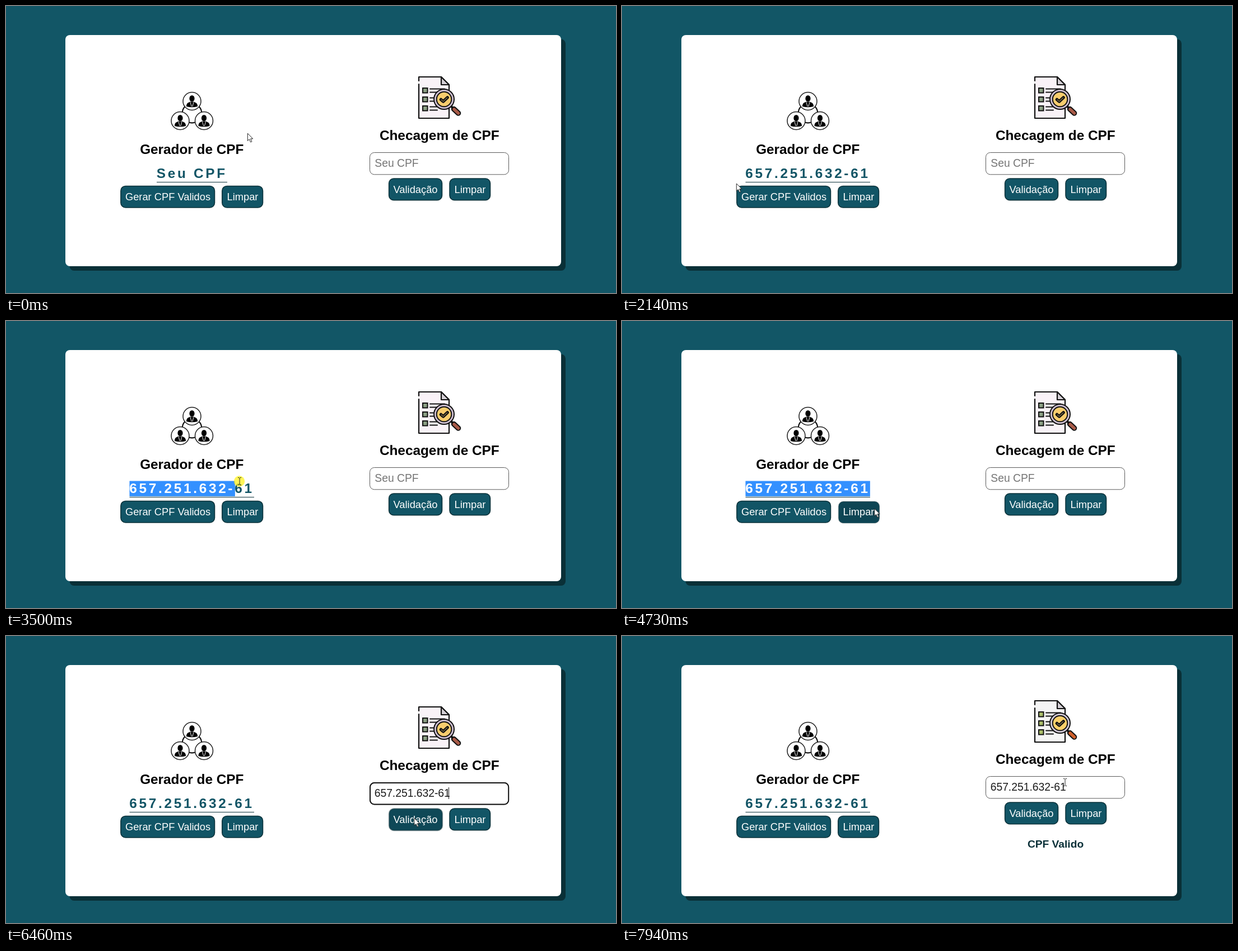
An HTML page that plays this animation: 1089 by 514 pixels, repeating every 8000 ms.

```html
<!DOCTYPE html>
<html lang="pt-BR">
<head>
<meta charset="utf-8">
<title>CPF</title>
<style>
  html, body { margin: 0; width: 100%; height: 100%; overflow: hidden; background: #125666; }
  svg { display: block; width: 1089px; height: 514px; font-family: "Liberation Sans", Arial, sans-serif; }

  /* Page state: 0/1 switches read by the parts below */
  #stage { animation: state 8s step-end infinite; }
  @keyframes state {
    0% { --made: 0; --focus: 0; --caret: 0; --pasted: 0; --done: 0;
         --page: #f9f2f7; --box: #8b9f83; --grip: #a95b48; --lens: #f8cd6e; --ring: #cfc0d2; }
    16.9% { --made: 1; }
    68.75% { --focus: 1; --caret: 1; }
    73.9% { --caret: 0; }
    76.4% { --pasted: 1; --caret: 1; }
    81.6% { --focus: 0; --caret: 0; --done: 1;
            --page: #f5f5f5; --box: #a9bc68; --grip: #d0602b; --lens: #fbd06a; --ring: #d3cbd8; }
  }
  .before { opacity: calc(1 - var(--made)); }
  .made { opacity: var(--made); }
  .focus { opacity: var(--focus); }
  .hint { opacity: calc(1 - var(--pasted)); }
  .pasted { opacity: var(--pasted); }
  .done { opacity: var(--done); }
  .caret { opacity: var(--caret); transform: translateX(calc(var(--pasted) * 132px)); }
  #check { transform: translateY(calc(var(--done) * -11px)); }

  .title { font-size: 24.35px; font-weight: bold; text-anchor: middle; fill: #000; }
  .cpf { font-size: 24.35px; font-weight: bold; letter-spacing: 3.7px; fill: #125566; }
  .field { font-size: 19.3px; }
  .btn rect { fill: #125566; stroke: #0a3038; stroke-width: 1.5px; }
  .btn text { font-size: 18.3px; fill: #fff; text-anchor: middle; }

  /* Buttons under the pointer */
  .make rect { animation: hoverMake 8s linear infinite; }
  .clear rect { animation: hoverClear 8s linear infinite; }
  .valid rect { animation: hoverValid 8s linear infinite; }
  @keyframes hoverMake {
    0%, 12.5% { fill: #125566; stroke: #0a3038; transform: none; filter: drop-shadow(0 0 0 #0000); }
    14% { stroke: #0a303800; transform: translate(1.2px, 1.2px); }
    16.3%, 20.6% { fill: #08303a; stroke: #0a303800; transform: translate(1.2px, 1.2px); filter: drop-shadow(1.7px 1.7px 0 #000); }
    24.4%, 100% { fill: #125566; stroke: #0a3038; transform: none; filter: drop-shadow(0 0 0 #0000); }
  }
  @keyframes hoverClear {
    0%, 57.3% { fill: #125566; stroke: #0a3038; transform: none; filter: drop-shadow(0 0 0 #0000); }
    59.5% { fill: #0d4250; stroke: #0a303800; transform: translate(1px, 1px); filter: drop-shadow(1px 1px 0 #000); }
    62.5%, 100% { fill: #125566; stroke: #0a3038; transform: none; filter: drop-shadow(0 0 0 #0000); }
  }
  @keyframes hoverValid {
    0%, 79.5% { fill: #125566; stroke: #0a3038; transform: none; filter: drop-shadow(0 0 0 #0000); }
    83.2%, 91.7% { fill: #08303a; stroke: #0a303800; transform: translate(1.1px, 1.1px); filter: drop-shadow(1.8px 1.8px 0 #000); }
    95%, 100% { fill: #125566; stroke: #0a3038; transform: none; filter: drop-shadow(0 0 0 #0000); }
  }

  /* Dragged selection, one glyph edge at a time */
  #edge { animation: drag 8s step-end infinite; width: 0; }
  @keyframes drag {
    0% { width: 0; }
    38.5% { width: 17.2px; }
    39.37% { width: 51.7px; }
    40.25% { width: 79.4px; }
    41.12% { width: 113.9px; }
    42% { width: 158.9px; }
    42.87% { width: 176.1px; }
    43.7% { width: 188.4px; }
    45.5% { width: 205.1px; }
    47.2% { width: 222.4px; }
    68.75%, 100% { width: 0; }
  }

  /* Pointer */
  #pointer { animation: move 8s linear infinite, shape 8s step-end infinite; }
  .arrow { opacity: calc(1 - var(--beam)); }
  .beam { opacity: var(--beam); }
  .press { opacity: var(--press); }
  @keyframes shape {
    0% { --beam: 0; --press: 0; }
    8% { --beam: 1; }
    11.9% { --beam: 0; }
    16.25% { --press: 1; }
    18.2% { --press: 0; }
    22.25% { --beam: 1; }
    26.1% { --beam: 0; }
    29.4% { --beam: 1; }
    37.75% { --press: 1; }
    53.1% { --press: 0; }
    56.5% { --beam: 0; }
    66.75% { --beam: 1; }
    68.75% { --press: 1; }
    72.5% { --press: 0; }
    79.1% { --beam: 0; }
    81.6% { --press: 1; }
    83.1% { --press: 0; }
    92.9% { --beam: 1; }
  }
  @keyframes move {
    0%, .8% { transform: translate(431px, 228px); }
    4% { transform: translate(500px, 185px); }
    5.25% { transform: translate(503px, 183px); }
    8% { transform: translate(430px, 240px); }
    10.1% { transform: translate(358px, 295px); }
    12.4% { transform: translate(338px, 328px); }
    14.5%, 18% { transform: translate(333px, 338px); }
    20.6% { transform: translate(376px, 334px); }
    23% { transform: translate(330px, 306px); }
    25% { transform: translate(270px, 302px); }
    26.75% { transform: translate(204px, 318px); }
    30.25%, 32.7% { transform: translate(219px, 297px); }
    35.25%, 37.75% { transform: translate(224px, 303px); }
    39.4% { transform: translate(276px, 299px); }
    41.1% { transform: translate(340px, 295px); }
    42% { transform: translate(382px, 292px); }
    43.75% { transform: translate(417px, 287px); }
    47.2% { transform: translate(434px, 287px); }
    48.1%, 55.6% { transform: translate(436px, 287px); }
    57.5% { transform: translate(428px, 325px); }
    58.75% { transform: translate(440px, 338px); }
    61% { transform: translate(500px, 325px); }
    65.25% { transform: translate(628px, 262px); }
    67.5% { transform: translate(668px, 279px); }
    68.75%, 76.4% { transform: translate(678px, 284px); }
    80% { transform: translate(720px, 318px); }
    81.25%, 83% { transform: translate(734px, 331px); }
    85.1%, 86.2% { transform: translate(741px, 338px); }
    90% { transform: translate(765px, 322px); }
    92.5% { transform: translate(786px, 300px); }
    93.75% { transform: translate(789px, 285px); }
    96.6% { transform: translate(779px, 266px); }
    97.4% { transform: translate(779px, 264px); }
    99.2%, 100% { transform: translate(791px, 262px); }
  }
</style>
</head>
<body>
<svg id="stage" viewBox="0 0 1089 514">
  <defs>
    <clipPath id="picked"><rect id="edge" x="220.5" y="286.5" height="27.5"/></clipPath>
    <g id="person">
      <circle r="16" fill="#fff" stroke="#1c1c1c" stroke-width="1.5"/>
      <ellipse cy="-4.8" rx="4.6" ry="5.8"/>
      <path d="M-10 9.5C-10 4-8 3-3.2 1H3.2C8 3 10 4 10 9.5Q0 12-10 9.5Z"/>
      <path d="M-3 1.8L-.8 9.5M3 1.8L.8 9.5" stroke="#fff" fill="none"/>
    </g>
    <g id="item">
      <rect x="744" y="-4" width="8.5" height="8.5" fill="var(--box)" stroke="#111" stroke-width="2"/>
      <path d="M757-2.5H783M757 3.5H770" stroke="#111" stroke-width="2" stroke-linecap="round"/>
    </g>
  </defs>

  <rect width="1089" height="514" fill="#125666"/>
  <rect x="113.5" y="59.5" width="885.5" height="414.5" rx="8" fill="#0a3037"/>
  <rect x="106" y="52" width="885" height="414" rx="8" fill="#fff"/>

  <g id="generator">
    <circle cx="332" cy="192" r="17.3" fill="none" stroke="#111" stroke-width="2.2"/>
    <use href="#person" x="332" y="170.5"/>
    <use href="#person" x="311" y="205.5"/>
    <use href="#person" x="353.5" y="205.5"/>
    <text class="title" x="331.8" y="264.5">Gerador de CPF</text>
    <g class="before">
      <text class="cpf" x="268.8" y="308">Seu CPF</text>
      <path d="M269 315.5H395" stroke="#0a3038"/>
    </g>
    <g class="made">
      <text class="cpf" x="220.3" y="308">657.251.632-61</text>
      <path d="M220.5 315.5H443" stroke="#0a3038"/>
    </g>
    <g clip-path="url(#picked)">
      <rect x="220" y="286" width="224" height="28" fill="#3390ff"/>
      <text class="cpf" x="220.3" y="308" style="fill:#fff">657.251.632-61</text>
    </g>
    <g class="btn make">
      <rect x="204.9" y="322.4" width="167.6" height="38.6" rx="8.5"/>
      <text x="289" y="348">Gerar CPF Validos</text>
    </g>
    <g class="btn clear">
      <rect x="385.8" y="322.4" width="72.7" height="38.6" rx="8.5"/>
      <text x="422.5" y="348">Limpar</text>
    </g>
  </g>

  <g id="check">
    <g stroke="#111" stroke-width="2.2" stroke-linejoin="round" stroke-linecap="round">
      <path d="M737 127H777L791 141V201H737Z" fill="var(--page)" stroke="none"/>
      <path d="M737 134V127H777L791 141V201H737V140" fill="none"/>
      <path d="M777 127V141H791Z" fill="#d4cfd5"/>
    </g>
    <use href="#item" y="151"/>
    <use href="#item" y="167"/>
    <use href="#item" y="183"/>
    <path d="M794 179L799 184" stroke="#111" stroke-width="4"/>
    <path d="M799.5 184.5L807.5 192" stroke="#111" stroke-width="9.5" stroke-linecap="round"/>
    <path d="M800 185L807.5 192" stroke="var(--grip)" stroke-width="5.5" stroke-linecap="round"/>
    <circle cx="782" cy="167" r="18" fill="var(--ring)" stroke="#111" stroke-width="2"/>
    <circle cx="782" cy="167" r="13.3" fill="var(--lens)" stroke="#111" stroke-width="2"/>
    <path d="M776.5 167.5L780.5 171L788 164" fill="none" stroke="#111" stroke-width="5.5" stroke-linejoin="round" stroke-linecap="round"/>
    <path d="M776.5 167.5L780.5 171L788 164" fill="none" stroke="#8b7a4c" stroke-width="1.2"/>

    <text class="title" x="773.8" y="240">Checagem de CPF</text>
    <rect x="649.5" y="262.5" width="248" height="39.3" rx="8" fill="#fff" stroke="#5a5a5a"/>
    <rect class="focus" x="650" y="263" width="247.2" height="38.4" rx="7.5" fill="none" stroke="#101010" stroke-width="2"/>
    <text class="field hint" x="658.3" y="288" fill="#757575">Seu CPF</text>
    <text class="field pasted" x="657.7" y="288" fill="#1c1c1c">657.251.632-61</text>
    <path class="caret" d="M658.5 271V292" stroke="#111"/>
    <g class="btn valid">
      <rect x="683.6" y="309.1" width="94.9" height="38.6" rx="8.5"/>
      <text x="731" y="334.5">Validação</text>
    </g>
    <g class="btn">
      <rect x="792" y="309.1" width="72.5" height="38.6" rx="8.5"/>
      <text x="828.5" y="334.5">Limpar</text>
    </g>
  </g>
  <text class="done" x="774" y="379" font-size="19.2" font-weight="bold" text-anchor="middle" fill="#0a3038">CPF Valido</text>

  <g id="pointer">
    <circle class="press" cx="-.5" r="9.7" fill="#fff21f" fill-opacity=".75"/>
    <path class="arrow" d="M.3 0V13.4L3.4 10.6L5.6 15.8L7.9 14.8L5.7 9.8H9.8Z" fill="#fff" stroke="#222" stroke-width="1"/>
    <path class="beam" d="M-3-6.5H-1L0-5.5L1-6.5H3M0-5.5V5.5M-3 6.5H-1L0 5.5L1 6.5H3" fill="none" stroke="#222" stroke-width="1"/>
  </g>
</svg>
</body>
</html>
```
